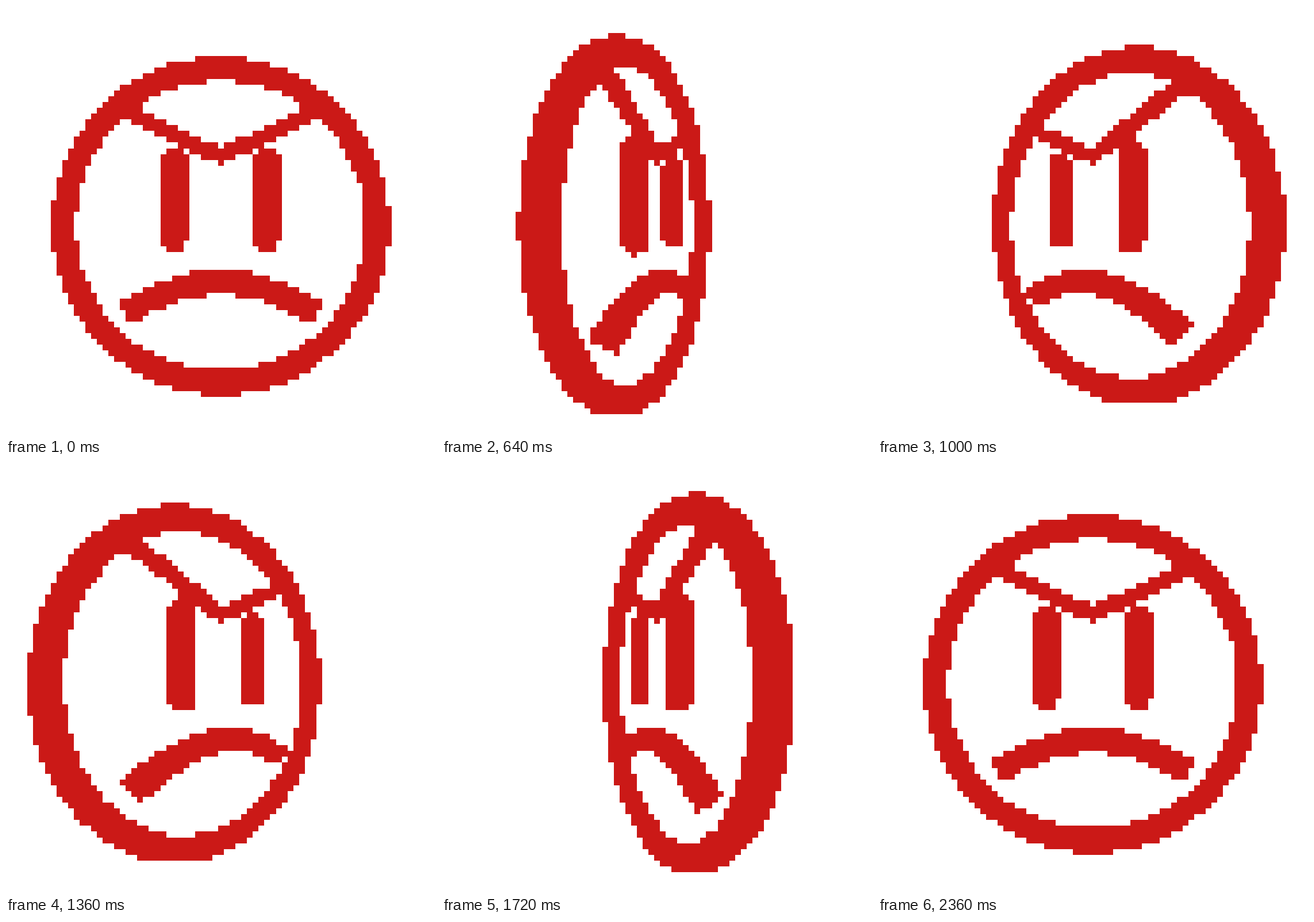
Animation of 748 by 748 pixels, one loop 2.44 s. Source, as an HTML page with a canvas:

```html
<!DOCTYPE html>
<html lang="en">
<head>
<meta charset="utf-8">
<title>Spinning face</title>
<style>
  html, body { margin: 0; width: 100%; height: 100%; overflow: hidden; background: #fff; }
  canvas { display: block; }
</style>
</head>
<body>
<canvas id="stage" width="748" height="748"></canvas>
<script>
const LOOP = 2440, STEP = 40, LAST = 59;
const CELL = 10.05, CX = 374.55, CY = 383.7; // size of a block, middle of the centre block
const HALF = 35, N = 2 * HALF + 1, SUB = 7;  // blocks around the centre, samples per block
const RADIUS = 27.2, PERSPECTIVE = 0.49;

const ctx = document.getElementById('stage').getContext('2d');
const fine = document.createElement('canvas');
fine.width = fine.height = N * SUB;
const pen = fine.getContext('2d', { willReadFrequently: true });
pen.lineJoin = 'round';

// Samples a curve for u from 0 to 1
const curve = (count, at) => Array.from({ length: count + 1 }, (_, i) => at(i / count));

const eye = x => ({ width: 4.3, cap: 'round', points: curve(8, u => [x, -11.5 + 13.8 * u]) });

const strokes = [
  { width: 4.2, cap: 'butt', points: curve(72, u => {
    const a = u * 2.06 * Math.PI;
    return [RADIUS * Math.cos(a), RADIUS * Math.sin(a)];
  }) },
  { width: 2.65, cap: 'butt', points: curve(20, u => {
    const x = 36 * u - 18;
    return [x, -12 - 0.47 * Math.abs(x)];
  }) },
  eye(-8), eye(8),
  { width: 4.3, cap: 'butt', points: curve(20, u => {
    const x = 33.2 * u - 16.6;
    return [x, 9.8 + 0.02 * x * x];
  }) }
];

function spinAngle(t) {
  const smooth = t * t * (3 - 2 * t);
  return 2 * Math.PI * (0.98 * smooth + 0.02 * t);
}

// Strokes always face the viewer; only their width follows the depth
function drawStroke({ width, cap, points }, cos, sin) {
  const flat = points.map(([x, y]) => {
    const depth = 1 + PERSPECTIVE * sin * x / RADIUS;
    return { x: x * cos / depth, y: y / depth, w: width / depth };
  });
  pen.lineCap = cap;
  for (let i = 1; i < flat.length - 1; i++) {
    pen.lineWidth = flat[i].w;
    pen.beginPath();
    for (const p of flat.slice(i - 1, i + 2)) pen.lineTo(p.x, p.y);
    pen.stroke();
  }
}

function draw(ms) {
  const step = Math.min(LAST, Math.floor(ms % LOOP / STEP));
  const angle = spinAngle(step / LAST);

  pen.setTransform(1, 0, 0, 1, 0, 0);
  pen.clearRect(0, 0, fine.width, fine.height);
  pen.setTransform(SUB, 0, 0, SUB, (HALF + 0.44) * SUB, (HALF + 0.4) * SUB);
  for (const s of strokes) drawStroke(s, Math.cos(angle), Math.sin(angle));

  const { data } = pen.getImageData(0, 0, fine.width, fine.height);
  const mid = SUB >> 1;
  const edge = (centre, i) => Math.floor(centre + (i - HALF - 0.5) * CELL);
  ctx.fillStyle = '#fff';
  ctx.fillRect(0, 0, 748, 748);
  ctx.fillStyle = '#cb1917';
  for (let row = 0; row < N; row++) {
    const y = edge(CY, row), h = edge(CY, row + 1) - y;
    for (let col = 0; col < N; col++) {
      const sample = (row * SUB + mid) * fine.width + col * SUB + mid;
      if (data[sample * 4 + 3] < 128) continue;
      const x = edge(CX, col);
      ctx.fillRect(x, y, edge(CX, col + 1) - x, h);
    }
  }
}

const start = performance.now();
function tick() {
  draw(performance.now() - start);
  requestAnimationFrame(tick);
}
tick();
</script>
</body>
</html>
```
